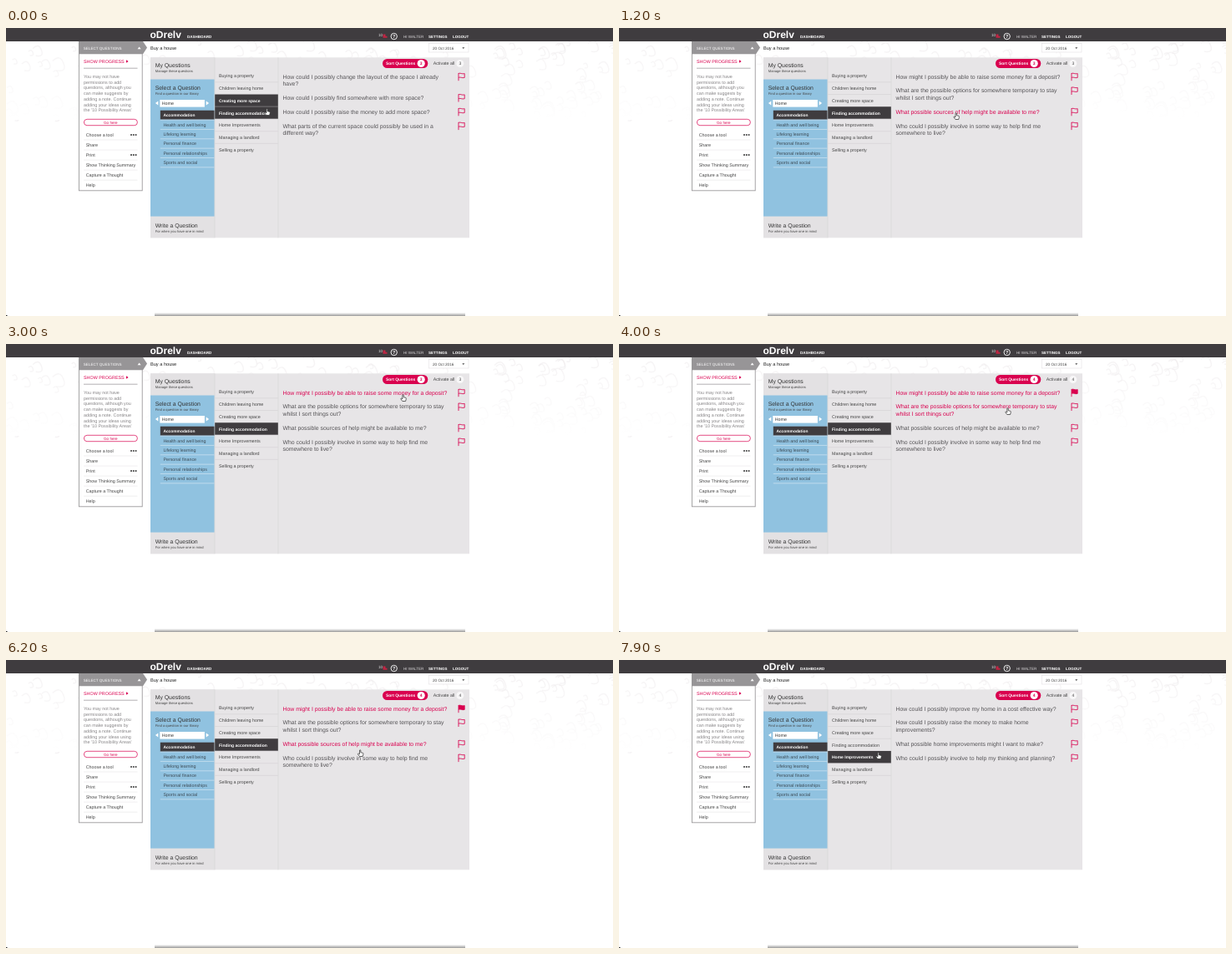
Recreate the animation shown at these times as an HTML page. Size 727 px wide and 345 px high, loop 8 s.

```html
<!DOCTYPE html>
<html lang="en">
<head>
<meta charset="utf-8">
<title>Question picker</title>
<style>
html, body { margin: 0; width: 100%; height: 100%; overflow: hidden; background: #fff; }
svg { display: block; width: 727px; height: 345px; }
text { font-family: "Liberation Sans", Arial, sans-serif; text-rendering: geometricPrecision; white-space: pre; }
</style>
</head>
<body>
<svg id="stage" viewBox="0 0 727 345" xmlns="http://www.w3.org/2000/svg">
  <defs>
    <linearGradient id="fade" x1="0" y1="0" x2="0" y2="1">
      <stop offset="0" stop-color="#fff" stop-opacity="0"/>
      <stop offset="1" stop-color="#fff"/>
    </linearGradient>
    <linearGradient id="shade" x1="0" y1="0" x2="0" y2="1">
      <stop offset="0" stop-color="#777" stop-opacity="0"/>
      <stop offset="1" stop-color="#777" stop-opacity=".75"/>
    </linearGradient>
  </defs>
</svg>
<script>
const LOOP = 8000, STEP = 100;
const PINK = '#d9004f', DARK = '#3f3c3f', INK = '#555356', BLUE = '#90c2e0';
const stage = document.getElementById('stage');

function add(tag, attrs, parent = stage) {
  const el = document.createElementNS('http://www.w3.org/2000/svg', tag);
  for (const key in attrs) el.setAttribute(key, attrs[key]);
  parent.appendChild(el);
  return el;
}
const box = (x, y, width, height, fill, more) => add('rect', { x, y, width, height, fill, ...more });
const path = (d, fill, more) => add('path', { d, fill, ...more });
const disc = (cx, cy, r, fill, more) => add('circle', { cx, cy, r, fill, ...more });
const line = (x1, x2, y, stroke, width = .6) => add('path', { d: `M${x1} ${y}H${x2}`, stroke, 'stroke-width': width });

// y is the middle of the capitals
function label(str, x, y, size, fill, more) {
  const el = add('text', { x, y: y + size * .35, 'font-size': size, fill, ...more });
  el.textContent = str;
  return el;
}
const BOLD = { 'font-weight': 700 };
const MID = { 'text-anchor': 'middle' };

function drawBackdrop() {
  let seed = 7;
  const rnd = () => (seed = seed * 16807 % 2147483647) / 2147483647;
  for (let i = 0; i < 210; i++) {
    const x = rnd() * 727, y = 16 + rnd() * 90, r = 3 + rnd() * 6;
    path(`M${x} ${y}q${r} ${-r} ${r * 1.5} ${r * .3}t${-r} ${r}`, 'none',
      { stroke: '#eeebec', 'stroke-width': 1.4, opacity: .6 });
  }
  box(0, 16, 727, 94, 'url(#fade)');
  box(178, 341, 372, 4, 'url(#shade)');
  box(0, 344, 1.5, 1, '#222');
}

function drawTopBar() {
  box(0, 0, 727, 16, DARK);
  label('oDrelv', 172.5, 8, 12, '#fff', BOLD);
  label('DASHBOARD', 217, 10.5, 4.53, '#fff', BOLD);
  label('10', 446, 8.5, 4.6, '#ddd');
  path('M451.5 7.5h3v2.2h2v2h-5z', '#c02443');
  disc(464.7, 10, 3.7, 'none', { stroke: '#fff', 'stroke-width': .9 });
  label('?', 464.7, 10.1, 5.6, '#fff', { ...MID, ...BOLD });
  label('HI WALTER', 476, 10.2, 4.58, '#d8d6d8');
  label('SETTINGS', 506, 10.2, 4.53, '#fff', BOLD);
  label('LOGOUT', 535, 10.2, 4.53, '#fff', BOLD);
  label('Buy a house', 173, 24, 5.62, '#222');
  box(506.5, 18.5, 47.5, 10.5, '#fff', { stroke: '#e4e2e4', 'stroke-width': .6 });
  label('20 Oct 2016', 511, 24, 4.68, '#444');
  path('M546.3 23.2h3l-1.5 1.9z', '#444');
}

function drawSidePanel() {
  box(87.4, 16.4, 75.8, 178.4, '#fff', { stroke: '#9b999b', 'stroke-width': .9 });
  path('M87 16H164L169 23.6L164 31.3H87z', '#979597');
  label('SELECT QUESTIONS', 92.8, 24, 4.57, '#fff');
  path('M157.6 25.2h4l-2-2.8z', '#fff');
  label('SHOW PROGRESS', 93, 40, 5.38, PINK);
  path('M144 38.3v3.4l2.6-1.7z', PINK);
  line(93, 157.5, 48.2, '#aaa8aa', .9);
  ['You may not have', 'permissions to add', 'questions, although you', 'can make suggests by',
    'adding a note. Continue', 'adding your ideas using', "the '10 Possibility Areas'"]
    .forEach((str, i) => label(str, 93, 58 + i * 6.75 * 1, 5.38, '#858385'));
  box(93.4, 109.3, 64, 7.4, '#fff', { rx: 3.7, stroke: PINK, 'stroke-width': .7 });
  label('Go here', 125.3, 113.2, 4.6, PINK, MID);
  ['Choose a tool', 'Share', 'Print', 'Show Thinking Summary', 'Capture a Thought', 'Help']
    .forEach((str, i) => {
      const y = 128 + i * 12.05;
      label(str, 95.7, y, 5.36, '#444');
      if (i < 5) line(93, 157.5, y + 6, '#e6e4e6');
      if (i === 0 || i === 2) for (const x of [150, 152.8, 155.6]) disc(x, y, 1.05, '#444');
    });
}

function drawMainPanel() {
  box(173, 35.3, 382, 216, '#e7e5e7');
  box(173, 35.3, 77, 26.2, '#e3e1e3');
  box(173, 61.5, 76.7, 164.3, BLUE);
  box(173, 225.8, 77, 25.5, '#e3e1e3');
  const heads = [['My Questions', 'Manage these questions', 45],
    ['Select a Question', 'Find a question in our library', 71.3],
    ['Write a Question', 'For when you have one in mind', 236.3]];
  for (const [head, sub, y] of heads) {
    label(head, 178.7, y, 6.86, '#333');
    label(sub, 178.7, y + 6.9, 4.15, '#444');
  }
  path('M182.3 87.6v5l-3.4-2.5zM239.7 87.6v5l3.4-2.5z', '#fff');
  box(184.3, 86, 53.6, 8.6, '#fff');
  label('Home', 186.8, 90.4, 5.3, '#333');
  box(184.8, 98.7, 64.9, 11, DARK);
  ['Accommodation', 'Health and well being', 'Lifelong learning', 'Personal finance',
    'Personal relationships', 'Sports and social'].forEach((str, i) => {
    const y = 104.4 + i * 11.35;
    label(str, 188.4, y, i ? 5.34 : 4.87, i ? '#3c4a54' : '#fff', i ? {} : BOLD);
    line(184.8, 249.5, y + 5.7, '#c9e1f0', .8);
  });
  path('M250 35.3V251.3M326 35.3V251.3', 'none', { stroke: '#d6d4d6', 'stroke-width': .6 });
  box(451, 37, 54.3, 11, PINK, { rx: 5.5 });
  label('Sort Questions', 455, 42.6, 4.93, '#fff', BOLD);
  disc(497.2, 42.5, 4.6, '#fff');
  label('Activate all', 511.7, 42.6, 5.3, '#444');
  disc(543.8, 42.5, 4.5, '#f8f7f8');
}

drawBackdrop();
drawTopBar();
drawSidePanel();
drawMainPanel();

const counts = [label('3', 497.2, 42.6, 5, PINK, { ...MID, ...BOLD }),
  label('3', 543.8, 42.6, 5, '#444', MID)];

const ROW = 14.72, LIST_TOP = 50.1;
const rows = ['Buying a property', 'Children leaving home', 'Creating more space',
  'Finding accommodation', 'Home Improvements', 'Managing a landlord', 'Selling a property']
  .map((str, i) => {
    const top = LIST_TOP + i * ROW;
    const bar = box(250.2, top, 75.6, ROW, DARK);
    if (i < 6) line(250.2, 325.8, top + ROW, '#d3d1d3');
    return { bar, text: label(str, 255, top + ROW / 2 + .1, 5.36, '#444') };
  });

const topics = {
  2: ['How could I possibly change the layout of the space I already|have?',
    'How could I possibly find somewhere with more space?',
    'How could I possibly raise the money to add more space?',
    'What parts of the current space could possibly be used in a|different way?'],
  3: ['How might I possibly be able to raise some money for a deposit?',
    'What are the possible options for somewhere temporary to stay|whilst I sort things out?',
    'What possible sources of help might be available to me?',
    'Who could I possibly involve in some way to help find me|somewhere to live?'],
  4: ['How could I possibly improve my home in a cost effective way?',
    'How could I possibly raise the money to make home|improvements?',
    'What possible home improvements might I want to make?',
    'Who could I possibly involve to help my thinking and planning?']
};

const LEAD = 8.5, GAP = 16.8;
const questions = [0, 1, 2, 3].map(() => ({
  lines: [0, 1].map(() => label('', 331.5, 0, 6.88, INK)),
  flag: path('M0 0V9.2M0 .4C2.4-.5 4.4 1.6 7.2.6V5.4C4.4 6.4 2.4 4.4 0 5.3', 'none',
    { stroke: PINK, 'stroke-width': .85 })
}));

const hand = add('g', {});
add('path', {
  d: 'M-1.1-4Q-.4-4.7.2-4V-1.3L2.9-.6Q3.5-.3 3.3.5L2.6 3.5H-1.2L-3.2.8Q-3.1-.2-2.1.1L-1.1.9z',
  fill: '#fff', stroke: '#333', 'stroke-width': .75, 'stroke-linejoin': 'round'
}, hand);

// time, x, y of the pointer
const route = [
  [0, 313, 101], [400, 313, 101], [1100, 404, 106], [1700, 406, 106], [2700, 475, 66],
  [3000, 476, 65], [3500, 476, 65], [4000, 466, 81], [4600, 463, 84], [5300, 456, 112],
  [5900, 450, 112], [7000, 311, 112], [7200, 310, 112], [7500, 311, 115], [LOOP, 311, 115]
];
const LOAD_FIRST = 400, FLAG_AT = 3400, COUNT_AT = 3500, LOAD_LAST = 7700;

function pointer(t) {
  const i = route.findIndex(p => p[0] > t);
  const [t0, x0, y0] = route[i - 1], [t1, x1, y1] = route[i];
  const u = (t - t0) / (t1 - t0), k = u * u * (3 - 2 * u);
  return [x0 + (x1 - x0) * k, y0 + (y1 - y0) * k];
}

function drawList(topic, x, tip) {
  const hover = x < 326 ? Math.floor((tip - LIST_TOP) / ROW) : -1;
  rows.forEach(({ bar, text }, i) => {
    const on = i === topic || i === hover;
    bar.setAttribute('visibility', on ? 'visible' : 'hidden');
    text.setAttribute('fill', on ? '#fff' : '#444');
    text.setAttribute('font-weight', on ? 700 : 400);
    text.setAttribute('font-size', on ? 5 : 5.36);
  });
}

function drawQuestions(topic, x, tip, flagged) {
  let y = 58.2;
  questions.forEach(({ lines, flag }, i) => {
    const parts = topics[topic][i].split('|');
    const height = GAP + (parts.length - 1) * LEAD;
    const hover = x > 328 && tip >= y - 8.4 && tip < y - 8.4 + height;
    const picked = flagged && i === 0;
    lines.forEach((el, n) => {
      el.textContent = parts[n] || '';
      el.setAttribute('y', y + n * LEAD + 2.4);
      el.setAttribute('fill', hover || picked ? PINK : INK);
    });
    flag.setAttribute('transform', `translate(542 ${y - 4.2})`);
    flag.setAttribute('fill', picked ? PINK : 'none');
    y += height;
  });
}

function render(t) {
  const [x, y] = pointer(t), tip = y - 4;
  const topic = t < LOAD_FIRST ? 2 : t < LOAD_LAST ? 3 : 4;
  drawList(topic, x, tip);
  drawQuestions(topic, x, tip, topic === 3 && t >= FLAG_AT);
  for (const el of counts) el.textContent = t < COUNT_AT ? '3' : '4';
  hand.setAttribute('transform', `translate(${x} ${y})`);
}

const start = performance.now();
function tick() {
  const t = (performance.now() - start) % LOOP;
  render(Math.floor(t / STEP) * STEP);
  requestAnimationFrame(tick);
}
tick();
</script>
</body>
</html>
```
